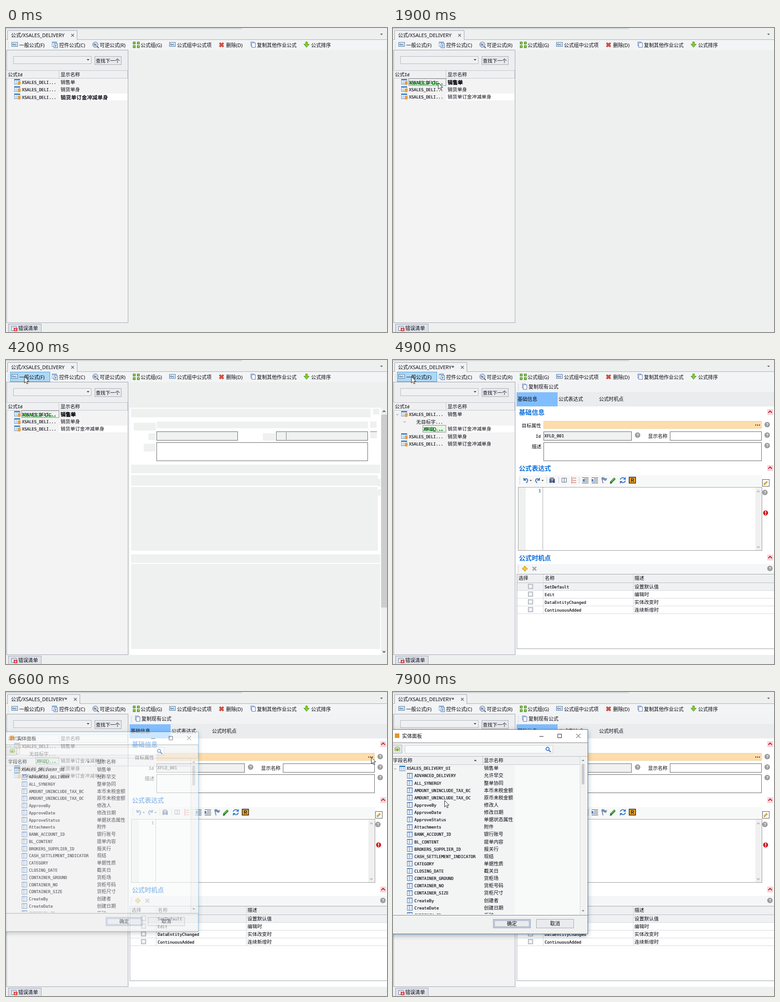
Animation of 838x668 px, one loop 8000 ms. Source, as an HTML page:

```html
<!DOCTYPE html>
<html lang="zh">
<head>
<meta charset="utf-8">
<title>公式</title>
<style>
  html, body { margin: 0; width: 100%; height: 100%; overflow: hidden; background: #eef0f0; }
  svg { display: block; width: 838px; height: 668px; }
  text { font-family: "Noto Sans", "Noto Sans CJK SC", "Noto Sans CJK", sans-serif; fill: #0a0a14; }
  .cjk { font-family: "Noto Sans CJK SC", "Noto Sans CJK", sans-serif; }
  .mono { font-family: "DejaVu Sans Mono", monospace; stroke: #0a0a14; stroke-width: .2px; }
  .arial { font-family: "Liberation Sans", sans-serif; font-weight: bold; }
  .bold { font-weight: bold; }
</style>
</head>
<body>
<svg id="stage" viewBox="0 0 838 668"></svg>
<script>
const LOOP = 8000;

// Drawing helpers: rectangles sit on whole pixels, text is placed by its middle line.
const fill = (x, y, w, h, c) => `<rect x="${x}" y="${y}" width="${w}" height="${h}" fill="${c}"/>`;
const box = (x, y, w, h, c, line, extra = '') =>
  `<rect x="${x + .5}" y="${y + .5}" width="${w - 1}" height="${h - 1}" fill="${c}" stroke="${line}" ${extra}/>`;
const path = (d, stroke, width = 1, c = 'none', extra = '') =>
  `<path d="${d}" fill="${c}" stroke="${stroke}" stroke-width="${width}" ${extra}/>`;
const shape = (d, c) => `<path d="${d}" fill="${c}"/>`;
const hline = (x, y, w, c) => fill(x, y, w, 1, c);
const vline = (x, y, h, c) => fill(x, y, 1, h, c);
const disc = (x, y, r, c) => `<circle cx="${x}" cy="${y}" r="${r}" fill="${c}"/>`;
const text = (x, cy, s, size = 10.9, cls = '', c = '') =>
  `<text x="${x}" y="${cy + size * .37}" font-size="${size}" class="${cls}" ${c && `style="fill:${c}"`}>${s}</text>`;
const grid = (x, cy, s, cls = '') => {
  const runs = s.match(/[\x20-\x7e]+|[^\x20-\x7e]+/g).map(r =>
    r < '\x7f' ? `<tspan class="mono" font-size="8.95">${r}</tspan>`
               : `<tspan class="cjk" font-size="10.7">${r}</tspan>`);
  return `<text x="${x}" y="${cy + 3.8}" class="${cls}">${runs.join('')}</text>`;
};
const group = (id, body, extra = '') => `<g id="${id}" ${extra}>${body}</g>`;
const down = (x, y, r, c = '#333') => shape(`M${x - r} ${y - r / 2}h${2 * r}l${-r} ${r}z`, c);
const up = (x, y, r, c = '#333') => shape(`M${x - r} ${y + r / 2}h${2 * r}l${-r} ${-r}z`, c);
const chevron = (x, y, dir, c, w = 1.4, r = 3) => path(`M${x - r} ${y - dir * r / 2}l${r} ${dir * r}l${r} ${-dir * r}`, c, w);
const cross = (x, y, r, c, w) => path(`M${x - r} ${y - r}l${2 * r} ${2 * r}M${x + r} ${y - r}l${-2 * r} ${2 * r}`, c, w);
const grip = (x, y) => [0, 4, 8, 12].map(d => fill(x, y + d, 1.5, 1.5, '#b4b7bf')).join('');
const dots = (x, y, w, h, c = '#222') => box(x, y, w, h, 'none', c, 'stroke-dasharray="1 1"');

const fxIcon = (x, y) => box(x, y, 14, 10, '#eaf2fb', '#47739f') + text(x + 2, y + 5, 'f(x)', 5.8, 'arial', '#234f82');
const copyIcon = (x, y) => box(x, y, 8, 10, '#dfe7f7', '#7389bd') + box(x + 2, y + 2, 9, 11, '#f5f8ff', '#6079b5');
const tableIcon = (x, y) => box(x, y, 13, 12, '#fff', '#6790bd') + fill(x, y, 13, 3, '#3c82c6') +
  path(`M${x + 4.5} ${y + 3}v9M${x + 8.5} ${y + 3}v9M${x} ${y + 6.5}h13M${x} ${y + 9.5}h13`, '#9dbbdb');
const entityIcon = y => tableIcon(18, y - 7) + `<rect x="26" y="${y - 2}" width="6" height="8" rx="2" fill="#e0932e"/>` +
  vline(28, y - 1, 6, '#f8cf87');
const fieldIcon = (x, y) => box(x, y, 12, 12, '#fff', '#3f6ba8') + fill(x + 1, y + 1, 10, 1, '#7fa6dc') +
  vline(x + 4, y + 1, 10, '#3f6ba8') + vline(x + 8, y + 1, 10, '#a9c3e6') +
  path(`M${x + 5} ${y + 4.5}h6M${x + 5} ${y + 7.5}h6`, '#c4d6ee');
const help = (x, y) => disc(x, y, 6, '#9c9c9c') + text(x - 2.6, y, '?', 9, 'arial', '#fff');

function frame() {
  const greens = [279, 288].map(x => [30, 38].map(y =>
    fill(x, y, 6, 6, '#5b9f28') + fill(x + 2, y + 2, 2, 2, '#d5ecb5')).join('')).join('');
  return fill(0, 0, 838, 668, '#eef0f0') + hline(0, 1, 519, '#b5b9c0') +
    hline(0, 25, 838, '#a9adb5') + fill(0, 26, 838, 23, '#f3f4f5') + grip(4, 31) + down(826, 14, 3, '#555') +
    box(1, 48, 268, 600, '#f3f3f4', '#a2a6b0') + fill(2, 49, 266, 44, '#eceef0') +
    box(16, 62, 172, 17, '#f0f1f2', '#b3b7bf') + down(180.5, 70, 3) +
    box(195, 62, 59, 19, '#e7e9ec', '#a5a9b3') + text(197.5, 72, '查找下一个', 10.6, 'cjk') +
    box(1, 93, 267, 18, '#eff0f1', '#c3c6cd') + vline(116, 94, 16, '#c3c6cd') +
    grid(4, 102, '公式Id') + grid(120, 102, '显示名称') +
    box(5, 650, 73, 20, '#dfe2e8', '#a2a6b2') + box(12, 655, 11, 10, '#fff', '#6676a5') +
    hline(14, 658, 6, '#9aa6c4') + fill(17, 659, 8, 7, '#d42e2e') + cross(21, 662.5, 1.8, '#fff', 1.1) +
    text(27, 660, '错误清单', 10.8, 'cjk') + greens;
}

const hot = () => box(9, 26, 88, 22, '#add8f6', '#4c9fd8');

function toolbar() {
  return fxIcon(12, 31) + text(29, 37.5, '一般公式(F)') +
    box(101, 30, 11, 11, '#fff', '#6d8fbb') + fill(101, 30, 11, 3, '#7ea5d4') + box(105, 34, 9, 10, '#e8f0fa', '#4b76ab') +
    text(108, 39, 'f', 8, 'arial', '#244f8a') + text(117, 37.5, '控件公式(C)') +
    disc(196.5, 36.5, 6.5, '#8792a6') + disc(196.5, 36.5, 5, '#dce7f5') + text(193, 36.5, 'fx', 7, 'arial', '#24427a') +
    path('M200 40l4 4', '#596270', 2) + text(206, 37.5, '可逆公式(R)') +
    text(296, 37.5, '公式组(G)') + fxIcon(359, 31) + text(376, 37.5, '公式组中公式项') +
    cross(474, 37, 4.2, '#b52b22', 4) + cross(474, 37, 4, '#e2574b', 2) + text(484, 37.5, '删除(D)') +
    copyIcon(538, 30) + text(552, 37.5, '复制其他作业公式') +
    path('M659 30.5h4v5h4l-6 7l-6-7h4z', '#4f9a20', 1, '#83c93b') + text(671, 37.5, '公式排序');
}

const tab = (w, name, x) => path(`M3.5 26V5.5H${w}.5V26`, '#9da2ad', 1, '#f1f2f4') +
  text(11, 16, name, 11) + cross(x, 16, 3, '#666', 1.4);

const treeRow = (y, name) => entityIcon(y) + grid(35, y, 'XSALES_DELI...') + grid(120, y, name);
const ORDER = '销货单订金冲减单身';
const lastCell = () => fill(117, 144, 150, 15, '#fff');

const treeStart = () => treeRow(119, '销售单') + treeRow(135, '销货单身') + lastCell() + entityIcon(151) +
  grid(35, 152, 'XSALES_DELI...') + text(120, 152.5, ORDER, 11.6, 'cjk bold');

const treePicked = () => treeRow(119, '销售单') + text(36, 120.5, 'XSALES_DE...', 10.9, 'arial', '#078c12') +
  text(120, 119.5, '销售单', 11.4, 'cjk bold') + dots(34, 111, 83, 16) +
  treeRow(135, '销货单身') + lastCell() + treeRow(151, ORDER);

const treeOpen = () => chevron(9.5, 120, 1, '#777', 1, 2.5) + treeRow(119, '销售单') +
  chevron(25.5, 136, 1, '#777', 1, 2.5) + grid(51, 136, '无目标字...') + lastCell() +
  fill(66, 144, 50, 15, '#e4f6e4') + grid(67, 151, 'XFLD_...') + text(67, 152, 'XFLD_...', 10.9, 'arial', '#078c12') +
  dots(65, 143, 52, 16) + grid(120, 151, ORDER) + treeRow(168, '销货单身') + treeRow(184, ORDER);

// The form before its controls are painted.
function blankForm() {
  const gaps = [[275, 107, 527, 19], [807, 107, 14, 13], [281, 138, 49, 17], [332, 135, 464, 15], [801, 135, 14, 14],
    [313, 161, 15, 15], [565, 161, 27, 16], [801, 158, 15, 14], [303, 184, 26, 17], [275, 230, 548, 19],
    [275, 253, 543, 23], [275, 279, 543, 140], [275, 427, 548, 19], [275, 448, 548, 187], [818, 261, 6, 17], [818, 284, 6, 14]];
  return fill(272, 105, 566, 543, '#fff') + gaps.map(g => fill(...g, '#eff0f0')).join('') +
    box(331, 157, 179, 20, '#f0f1f1', '#666') + box(594, 157, 202, 20, '#f0f1f1', '#666') + vline(616, 159, 16, '#777') +
    hline(801, 157, 15, '#777') + box(331, 181, 465, 41, '#fff', '#666') +
    fill(825, 105, 13, 543, '#f0f0f0') + fill(825, 120, 13, 424, '#cdcdcd') +
    chevron(831.5, 113, -1, '#444', 1.6) + chevron(831.5, 641, 1, '#444', 1.6);
}

function editorIcons() {
  const undo = (x, d) => path(`M${x - 4 * d} 259v5h${5 * d}M${x - 4 * d} 264q${5 * d} -6 ${8 * d} -1q${d} 4 ${-3 * d} 7`, '#3c72bd', 2);
  const lines = x => [258, 261, 264, 267, 270].map(y => hline(x, y, 14, '#4c5565')).join('');
  return grip(278, 258) + undo(292, 1) + down(303, 265, 2.5) + undo(318, -1) + down(329, 265, 2.5) +
    vline(338, 257, 14, '#c4c7cd') + fill(344, 261, 5, 9, '#55647d') + fill(351, 261, 5, 9, '#55647d') +
    fill(345, 258, 9, 4, '#8593aa') + text(348, 266, 'ab', 7, 'arial', '#234ba0') + vline(364, 257, 14, '#c4c7cd') +
    box(371, 259, 6, 10, '#f5f7fa', '#5b6678') + box(376, 259, 6, 10, '#f5f7fa', '#5b6678') +
    [259, 264, 269].map((y, i) => text(392, y, i + 1, 5.5, 'arial', '#c52828') + hline(396, y, 7, '#d14d3d')).join('') +
    vline(409, 257, 14, '#c4c7cd') + lines(416) + fill(416, 261, 5, 6, '#fff') + shape('M416 264l5-3v6z', '#2364b7') +
    lines(437) + fill(437, 261, 5, 6, '#fff') + shape('M442 264l-5-3v6z', '#2364b7') +
    path('M459 259l3 12', '#61728c', 1.5) + shape('M459 258q4-2 6 1q3 2 6 0l-2 6q-3 1-5-1q-2-2-4 0z', '#7890ae') +
    path('M479 269l9-9', '#338633', 5) + path('M480 267l8-8', '#69ba55', 2) + shape('M477 272l1-5l4 4z', '#2e6730') +
    path('M500 263a5.5 5.5 0 0 1 10-2M511 265a5.5 5.5 0 0 1-10 2', '#3b7cca', 2) +
    shape('M512 257v6h-6zM499 272v-6h6z', '#3b7cca') +
    box(519, 257, 15, 14, '#f5a623', '#222', 'stroke-width="1.5"') + text(523, 264, 'R', 10, 'arial', '#221a10');
}

function form() {
  const head = (y, s) => text(277, y, s, 14.1, 'cjk bold', '#0c70dc') +
    fill(823, y - 7, 13, 13, '#f5d6da') + chevron(829.5, y - 1, -1, '#cb1d2d', 2, 4);
  const rows = [['SetDefault', '设置默认值'], ['Edit', '编辑时'], ['DataEntityChanged', '实体改变时'], ['ContinuousAdded', '连续新增时']];
  return fill(270, 49, 568, 599, '#fff') + fill(270, 49, 568, 21, '#f2f3f4') + grip(275, 53) + copyIcon(284, 52) +
    text(298, 59, '复制现有公式', 11) + fill(270, 70, 568, 32, '#eaecee') + fill(272, 71, 90, 31, '#80beff') +
    text(274, 86, '基础信息', 10.8) + text(364, 86, '公式表达式', 10.8) + text(453, 86, '公式时机点', 10.8) +
    head(115, '基础信息') + grid(283, 144, '目标属性') + box(331, 134, 480, 17, '#ffdda9', '#ead0a6') +
    [797, 801, 805].map(x => fill(x, 142, 2, 2, '#222')).join('') +
    grid(314, 167, 'Id') + box(331, 157, 194, 20, '#f0f1f1', '#666') + grid(333, 166, 'XFLD_001') +
    grid(561, 167, '显示名称') + box(609, 157, 202, 20, '#fff', '#666') +
    grid(305, 190, '描述') + box(331, 181, 480, 41, '#fff', '#666') +
    help(823, 142) + help(538, 165) + help(823, 165) + help(823, 188) + help(818, 291) +
    head(238, '公式表达式') + fill(275, 253, 537, 24, '#f7f8f8') + editorIcons() +
    box(812, 262, 16, 16, '#fff', '#555') + path('M816 274l7-7', '#a87622', 3.5) + path('M816.5 273.5l6.5-6.5', '#f1cd58', 1.7) +
    box(275, 279, 537, 140, '#fff', '#9a9a9a') + fill(276, 280, 16, 138, '#eff0f0') + text(320, 288, '1', 9, 'mono', '#2680b8') +
    path('M329.5 280v138', '#555', 1, 'none', 'stroke-dasharray="1 1"') + fill(797, 280, 14, 138, '#f0f0f0') +
    chevron(803.5, 289, -1, '#aaa') + chevron(803.5, 411, 1, '#aaa') +
    head(434.5, '公式时机点') + fill(272, 448, 566, 21, '#f5f6f7') + grip(275, 452) +
    path('M290 453v11M284.5 458.5h11', '#b58410', 4) + path('M290 454v9M285.5 458.5h9', '#ffd94a', 2) +
    cross(311, 458.5, 4, '#a9a9a9', 3) + help(829, 458) +
    box(272, 470, 567, 165, '#fff', '#9b9fa8') + fill(273, 471, 565, 18, '#eff0f1') + fill(273, 489, 565, 17, '#f0f1f3') +
    grid(276, 479.5, '选择') + grid(334, 479.5, '名称') + grid(531, 479.5, '描述') + hline(273, 489, 565, '#babec5') +
    vline(330, 471, 86, '#d0d3d8') + vline(528, 471, 86, '#d0d3d8') +
    rows.map(([a, b], i) => {
      const y = 498 + 17 * i;
      return box(297, y - 6, 11, 11, '#eef0f3', '#9398a2') + box(299, y - 4, 7, 7, '#fff', '#d0d3d9') +
        grid(333.5, y, a) + grid(531, y, b) + hline(273, y + 8, 565, '#d5d8dc');
    }).join('');
}

const FIELDS = `ADVANCED_DELIVERY 允许早交,ALL_SYNERGY 整单协同,AMOUNT_UNINCLUDE_TAX_BC 本币未税金额,
AMOUNT_UNINCLUDE_TAX_OC 原币未税金额,ApproveBy 修改人,ApproveDate 修改日期,ApproveStatus 单据状态属性,Attachments 附件,
BANK_ACCOUNT_ID 银行账号,BL_CONTENT 提单内容,BROKERS_SUPPLIER_ID 报关行,CASH_SETTLEMENT_INDICATOR 现结,CATEGORY 单据性质,
CLOSING_DATE 截关日,CONTAINER_GROUND 货柜场,CONTAINER_NO 货柜号码,CONTAINER_SIZE 货柜尺寸,CreateBy 创建者,
CreateDate 创建日期,CURRENCY_ID 币种`.split(',').map(s => s.trim().split(' '));

function dialog() {
  const list = FIELDS.map(([a, b], i) => {
    const y = 183.6 + 16.13 * i;
    return fieldIcon(31, Math.round(y) - 6) + grid(47, y, a) + grid(200, y, b);
  }).join('');
  const button = (x, w, s) => box(x, 499, w, 20, '#e9ebee', '#a4a8b2') + text(x + w / 2 - 11, 509, s, 10.9, 'cjk');
  return `<rect x="-12" y="83" width="440" height="448" fill="#f0f1f1" filter="url(#soft)"/>` +
    box(-12, 82, 441, 450, '#f0f1f1', '#2585cf') + fill(-8, 83, 436, 28, '#fff') + fill(4, 91, 10, 10, '#e2952f') +
    text(20, 97, '实体面板', 10.9, 'cjk') + hline(322, 97, 9, '#222') + box(362, 92, 9, 9, 'none', '#222') + cross(407.5, 96.5, 4.5, '#222', 1) +
    hline(-8, 111, 436, '#7d8189') + box(-8, 116, 28, 19, '#e4e7e8', '#aaaeb5') +
    disc(9.5, 126, 6, '#84ad39') + path('M6 126a3.5 3.5 0 0 1 7 0M13 127a3.5 3.5 0 0 1-7 1', '#f1f7df', 1.8) +
    box(26, 117, 326, 18, '#fafbfb', '#cdd1d8') + `<circle cx="340" cy="125" r="3.6" fill="#e7f0ff" stroke="#2b66c9" stroke-width="1.6"/>` +
    path('M343 128l4 4', '#2b66c9', 2.2) +
    fill(-8, 142, 436, 348, '#f8f9f9') + fill(-8, 160, 275, 328, '#f3f4f4') + fill(-8, 142, 420, 17, '#eff0f1') +
    hline(-8, 141, 436, '#b9bdc5') + hline(-8, 159, 420, '#c6c9d0') + vline(197, 142, 17, '#b9bdc5') + vline(411, 142, 347, '#d5d7dc') +
    grid(0, 150, '字段名称') + grid(200, 150, '显示名称') + up(181, 150, 3) +
    `<g clip-path="url(#rows)">` + chevron(5, 169, 1, '#777', 1, 2.5) + tableIcon(14, 162) +
    grid(30, 167.5, 'XSALES_DELIVERY_UI') + grid(200, 167.5, '销售单') + list + `</g>` +
    fill(412, 142, 15, 347, '#f1f2f2') + up(418, 150, 3, '#777') + fill(415, 158, 6, 45, '#c9cacc') + down(418, 481, 3, '#777') +
    hline(-8, 490, 436, '#7d8189') +
    button(220, 83, '确定') + box(221, 500, 81, 18, 'none', '#a3c0ee', 'stroke-width="1.5"') +
    dots(223, 502, 77, 14, '#55607a') + button(315, 83, '取消');
}

const stage = document.getElementById('stage');
stage.innerHTML = `<defs><clipPath id="rows"><rect x="-8" y="160" width="420" height="328"/></clipPath>
  <filter id="soft" x="-10%" y="-10%" width="120%" height="120%"><feDropShadow dx="0" dy="3" stdDeviation="6" flood-opacity=".36"/></filter></defs>` +
  frame() + group('hot', hot()) + toolbar() +
  group('tabClean', tab(156, '公式/XSALES_DELIVERY', 146.5)) + group('tabDirty', tab(162, '公式/XSALES_DELIVERY*', 152.5)) +
  group('treeStart', treeStart()) + group('treePicked', treePicked()) + group('treeOpen', treeOpen()) +
  group('blank', blankForm()) + group('form', form()) +
  group('error', disc(819.5, 336, 5.5, '#d3141c') + fill(818.5, 332, 2, 5, '#fff') + fill(818.5, 338, 2, 2, '#fff')) +
  group('dialog', dialog()) +
  group('cursor', path('M.5 .5V14.5l3.3-3l2.2 5l2.3-1l-2.2-4.8h4.3z', '#222', 1, '#fff'));

// Visible spans of each part, in ms.
const SPANS = {
  hot: [[2900, 5200]],
  tabClean: [[0, 4400]], tabDirty: [[4400, LOOP]],
  treeStart: [[0, 1900]], treePicked: [[1900, 4400]], treeOpen: [[4400, LOOP]],
  blank: [[4200, 4300]], form: [[4300, LOOP]],
  error: [[4400, 4700], [4900, 5200], [5400, 5700], [6000, 6200], [6500, LOOP]],
  dialog: [[6500, LOOP]],
  cursor: [[400, LOOP]]
};

// Pointer paths: start time, then one point per 100 ms; the last point holds.
const MOVES = [
  [400, [706, 51], [640, 62], [540, 78], [430, 92], [330, 104], [240, 112], [160, 117], [118, 119], [101, 120], [100, 120]],
  [1500, [99, 120]],
  [2200, [118, 104], [165, 66], [225, 28], [271, 6], [245, 0], [175, 8], [105, 22], [58, 32], [40, 36]],
  [5100, [55, 37], [120, 43], [220, 52], [340, 63], [470, 77], [600, 93], [735, 112], [780, 132], [797, 140],
    [798, 141], [800, 142], [802, 143], [803, 143]],
  [7000, [790, 144], [740, 149], [650, 158], [540, 168], [420, 179], [300, 190], [210, 199], [150, 206], [124, 209], [113, 238]]
];

const parts = Object.fromEntries(Object.keys(SPANS).map(id => [id, document.getElementById(id)]));
// Opacity and scale of the opening dialog, one pair per 100 ms.
const FADE = [[.3, .955], [.62, .977], [.87, .991], [1, 1]];

function draw() {
  const t = performance.now() % LOOP;
  for (const id in SPANS)
    parts[id].style.display = SPANS[id].some(([a, b]) => t >= a && t < b) ? '' : 'none';

  const move = MOVES.findLast(m => t >= m[0]);
  if (move) {
    const i = Math.min(1 + Math.floor((t - move[0]) / 100), move.length - 1);
    parts.cursor.setAttribute('transform', `translate(${move[i]})`);
  }
  if (t >= 6500) {
    const [alpha, k] = FADE[Math.min(3, Math.floor((t - 6500) / 100))];
    parts.dialog.setAttribute('opacity', alpha);
    parts.dialog.setAttribute('transform', `translate(195 307) scale(${k}) translate(-195 -307)`);
  }
  requestAnimationFrame(draw);
}
draw();
</script>
</body>
</html>
```
